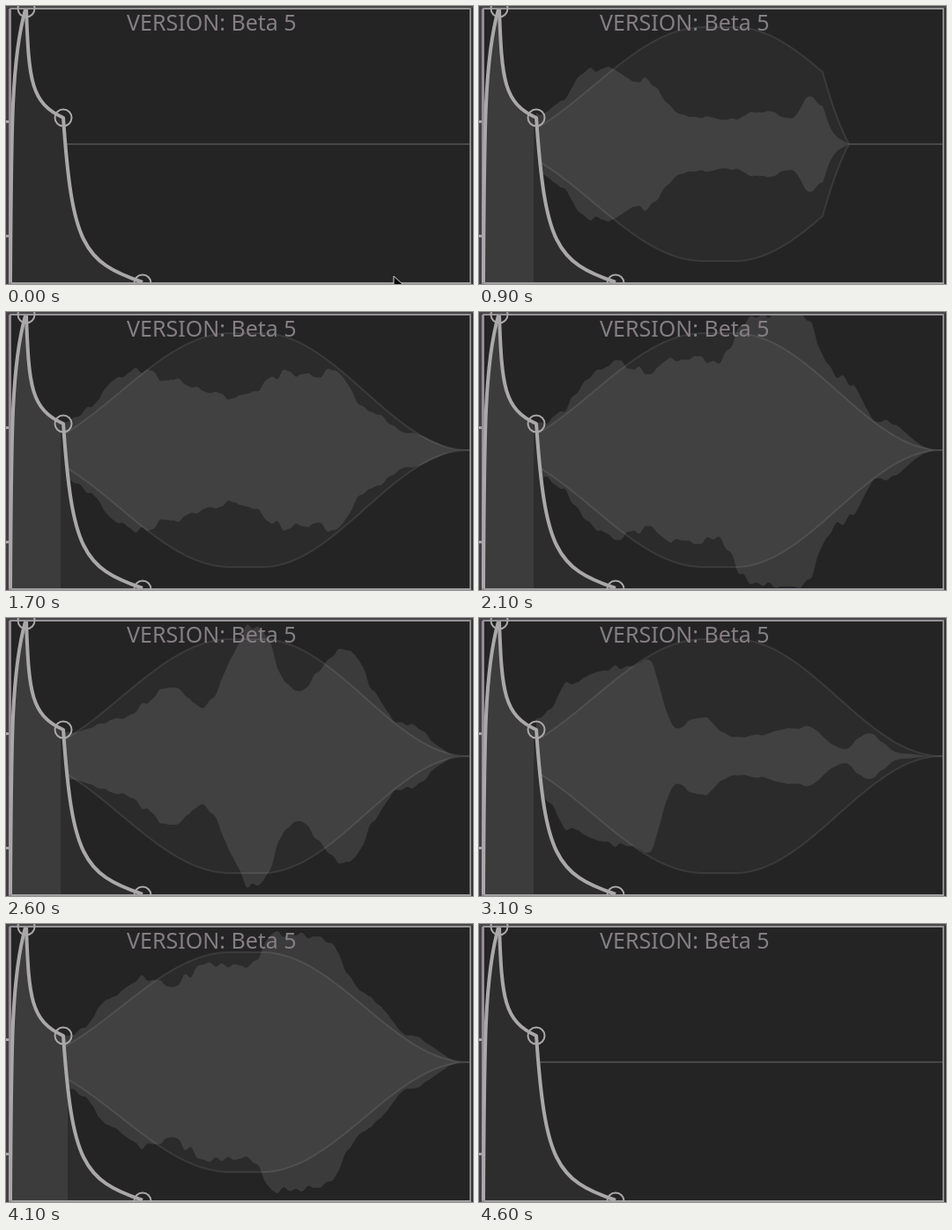
These frames come from a looping animation (530x316 px, 4800 ms). An HTML page with a canvas:

```html
<!DOCTYPE html>
<html lang="en">
<head>
<meta charset="utf-8">
<title>Envelope display</title>
<style>
html, body { margin: 0; width: 100%; height: 100%; overflow: hidden; background: #232323; }
canvas { display: block; }
</style>
</head>
<body>
<canvas id="view" width="530" height="316"></canvas>
<script>
const g = document.getElementById('view').getContext('2d');
const LOOP = 4800, STEP = 100, MID = 157, LEFT = 64, RIGHT = 526;

// Peaks and dips of the waveform: [x, half-height]
const soft = [[68, 34], [135, 85], [183, 74], [232, 33], [285, 27], [320, 38], [355, 29], [376, 53], [412, 17], [515, 0]];
const loud = [[68, 30], [158, 101], [190, 88], [225, 105], [270, 102], [310, 152], [362, 158], [410, 84], [455, 33], [520, 0]];
const twin = [[68, 26], [125, 42], [192, 81], [222, 54], [282, 150], [328, 73], [380, 121], [450, 38], [515, 0]];
const front = [[68, 42], [105, 86], [192, 107], [225, 32], [250, 45], [290, 21], [370, 33], [415, 8], [440, 26], [480, 3], [515, 0]];
const round = [[68, 28], [115, 79], [160, 82], [240, 126], [325, 113], [372, 47], [410, 38], [515, 0]];
const keys = [[0, soft], [1400, soft], [2100, loud], [2600, twin], [3100, front], [3700, round], [4200, loud], [LOOP, loud]];

const clamp = (v, a = 0, b = 1) => Math.min(b, Math.max(a, v));
const mix = (a, b, k) => a + (b - a) * k;
const ease = k => (1 - Math.cos(Math.PI * clamp(k))) / 2;
const random = n => { const s = Math.sin(n * 12.9898) * 43758.5453; return s - Math.floor(s); };

const attackPath = 'M5 314C6 140 6 60 22 4';
const decayPath = '23 4C26 85 28 110 65 127';
const releasePath = '65 127C75 270 87 291 155 314';
const attack = new Path2D(attackPath);
const decay = new Path2D(`M${decayPath}L${releasePath}`);
const under = new Path2D(`${attackPath}L${decayPath}L${releasePath}Z`);
const beyond = new Path2D(`M65 4L${releasePath}L526 314L526 4Z`);

function noise(x, seed) {
  const i = Math.floor(x / 7);
  return mix(random(i + seed), random(i + 1 + seed), ease(x / 7 - i)) - 0.5;
}

function level(points, x) {
  const i = points.findIndex(p => p[0] > x);
  if (i < 0) return 0;
  if (i === 0) return points[0][1];
  const [x0, a] = points[i - 1], [x1, b] = points[i];
  return mix(a, b, ease((x - x0) / (x1 - x0)));
}

function waveAt(t, x) {
  const i = keys.findIndex(k => k[0] > t);
  const [t0, a] = keys[i - 1], [t1, b] = keys[i];
  const h = mix(level(a, x), level(b, x), (t - t0) / (t1 - t0));
  return h + noise(x, t) * Math.min(10, h * 0.16);
}

function lensAt(x) {
  const d = x < 255 ? (255 - x) / 250 : x > 290 ? (x - 290) / 235 : 0;
  return 1 - ease(d);
}

function trace(height, sign) {
  for (let i = 0; i <= RIGHT - LEFT; i += 2) {
    const x = sign < 0 ? LEFT + i : RIGHT - i;
    g.lineTo(x, MID + sign * height(x));
  }
}

function fillBand(height, color) {
  g.beginPath();
  trace(height, -1);
  trace(height, 1);
  g.closePath();
  g.fillStyle = color;
  g.fill();
}

function strokeEdge(height, sign) {
  g.beginPath();
  trace(height, sign);
  g.strokeStyle = 'rgba(255,255,255,.085)';
  g.lineWidth = 2;
  g.stroke();
}

function drawSound(t) {
  const head = 6 + 46 * t / STEP;
  const fall = clamp((4600 - t) / 400);
  const tall = t < 3700 ? 133 : 125;
  const gate = x => t < STEP ? 0 : clamp((head - x) / 30) * fall;
  const lens = x => tall * lensAt(x) * gate(x);
  const wave = x => waveAt(t, x) * gate(x);

  g.save();
  g.clip(beyond);
  fillBand(lens, 'rgba(255,255,255,.033)');
  fillBand(wave, 'rgba(255,255,255,.105)');
  strokeEdge(lens, -1);
  strokeEdge(lens, 1);
  g.restore();

  if (t < STEP || fall === 0) return;
  const half = (t < 700 ? Math.min(130, t * 0.65) : 160) * fall;
  const edge = Math.min(head, t < 3700 ? 62 : 70);
  g.save();
  g.clip(under);
  bar('#3c3c3c', 5, MID - half, edge - 5, half * 2);
  g.restore();
}

function bar(color, x, y, w, h) {
  g.fillStyle = color;
  g.fillRect(x, y, w, h);
}

function drawFrame() {
  bar('#484648', 0, 0, 530, 2);
  bar('#959395', 4, 2, 524, 2);
  bar('#8c8a8c', 526, 2, 2, 314);
  bar('#333', 528, 2, 2, 314);
  bar('#a09ea0', 4, 314, 524, 2);
  bar('#443e45', 0, 2, 3, 314);
  bar('#aaa3aa', 0, 130, 4, 3);
  bar('#aaa3aa', 0, 260, 4, 3);
  bar('#958b95', 3, 3, 3, 313);
}

function drawCurve() {
  g.strokeStyle = '#aaa8a9';
  g.lineWidth = 4;
  g.lineJoin = 'round';
  g.stroke(attack);
  g.stroke(decay);
  g.lineWidth = 2;
  for (const [x, y] of [[23, 3], [65, 127], [155, 315]]) {
    g.beginPath();
    g.arc(x, y, 9.5, 0, Math.PI * 2);
    g.stroke();
  }
}

function drawPointer() {
  g.beginPath();
  g.moveTo(440, 307);
  g.lineTo(440, 322);
  g.lineTo(451, 317);
  g.closePath();
  g.fillStyle = '#050505';
  g.fill();
  g.strokeStyle = '#d8d8d8';
  g.lineWidth = 1;
  g.stroke();
}

function draw(t) {
  bar('#242424', 0, 0, 530, 316);
  g.fillStyle = '#2d2d2d';
  g.fill(under);
  drawSound(t);
  drawFrame();
  drawCurve();
  g.fillStyle = '#857e84';
  g.font = '25px "Noto Sans", "Open Sans", sans-serif';
  g.fillText('VERSION: Beta 5', 137, 28);
  if (t < 700) drawPointer();
}

const start = performance.now();
function tick() {
  const t = (performance.now() - start) % LOOP;
  draw(Math.floor(t / STEP) * STEP);
  requestAnimationFrame(tick);
}
tick();
</script>
</body>
</html>
```
